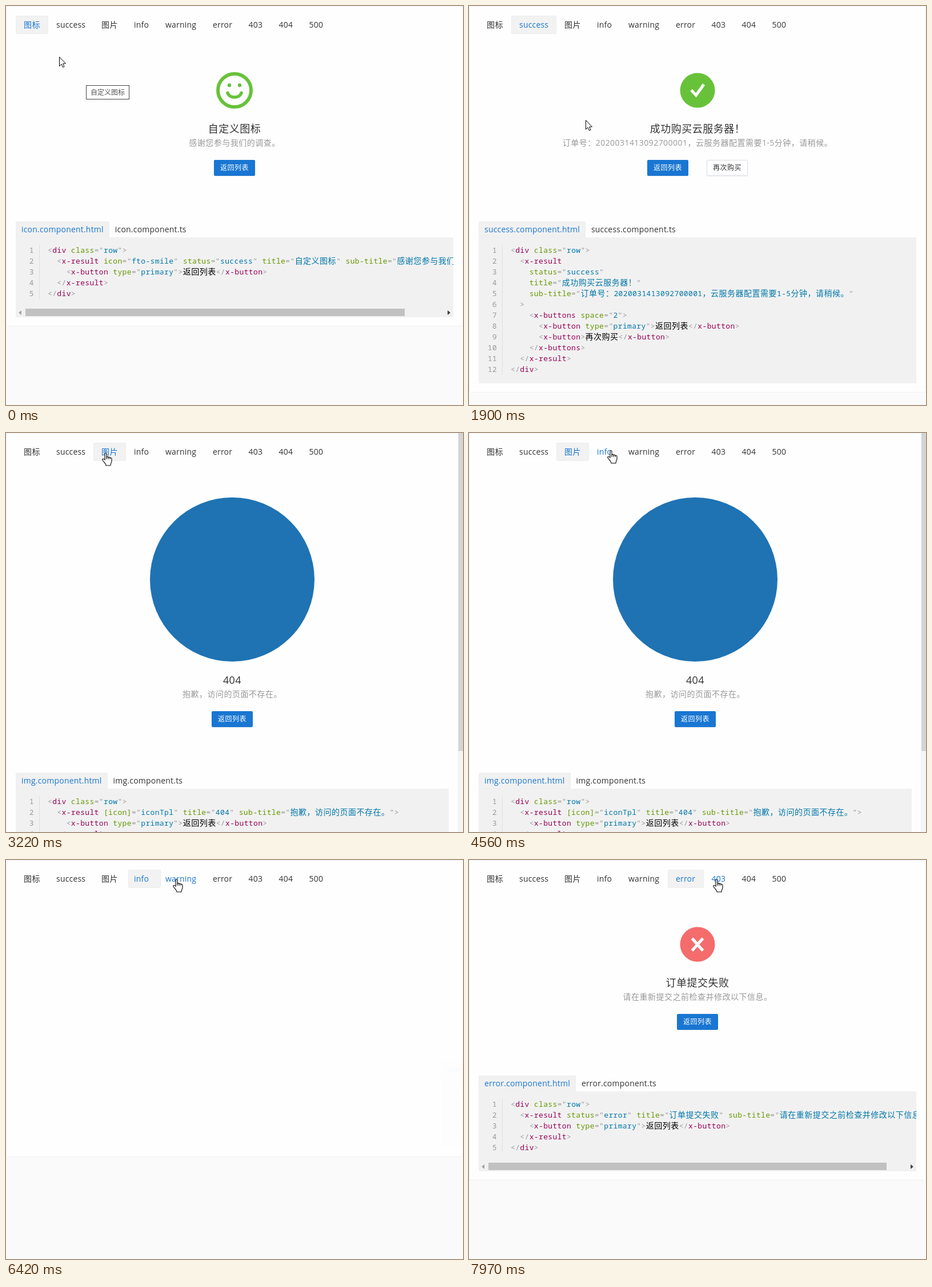
Recreate the animation shown at these times as an HTML page. Size 800 px wide and 700 px high, loop 8000 ms.

```html
<!DOCTYPE html>
<html lang="zh-CN">
<head>
<meta charset="utf-8">
<style>
html, body { margin: 0; width: 100%; height: 100%; overflow: hidden; background: #fafafa; }
body { position: relative; font: 14px 'Open Sans', 'Noto Sans CJK SC', 'Noto Sans CJK', sans-serif; letter-spacing: .2px; color: #333; }
div, svg { position: absolute; box-sizing: border-box; white-space: pre; }
i { font-style: normal; letter-spacing: .5px; line-height: 0; }
#card { left: 0; top: 0; overflow: hidden; background: #fefefe; }
#card::after { content: ''; position: absolute; inset: 0; border: 1px solid #f0f1fa; }
#ink { top: 17px; height: 32px; background: #f2f2f2; border: 1px solid #ededee; border-radius: 2px; }
.tab { top: 17px; line-height: 32px; }
.page { left: 0; top: 0; height: 100%; }
.title, .sub { width: 100%; text-align: center; letter-spacing: .45px; }
.title { font-size: 18px; line-height: 24px; }
.sub { line-height: 20px; color: #999; }
.btn { width: 72px; height: 28px; border: 1px solid #d9dde6; border-radius: 2px; background: #fff; font-size: 12px; line-height: 25px; text-align: center; box-shadow: 0 1px 2px #0001; }
.primary { background: #1976d2; border-color: #1976d2; color: #fff; font-weight: 500; }
.files { left: 17px; height: 28px; line-height: 28px; display: flex; }
.files span { padding: 0 10px; }
.files .on { background: #f1f1f1; color: #1976d2; border-radius: 2px 2px 0 0; box-shadow: inset 0 0 0 1px #eee; }
.code { left: 17px; background: #f1f1f1; overflow: hidden; font: 13px/19px 'Noto Sans Mono', 'Noto Sans CJK SC', 'Noto Sans CJK', monospace; letter-spacing: .36px; color: #000; }
.code i { font: 14px/0 'Noto Sans CJK SC', 'Noto Sans CJK', sans-serif; letter-spacing: .5px; }
.nums { left: 0; top: 13px; width: 42px; padding-right: 9px; text-align: right; color: #999; border-right: 1px solid #dcdfe6; }
.line { left: 56px; height: 19px; }
.p { color: #999; } .t { color: #905; } .a { color: #690; } .v { color: #07a; }
.track { left: 0; width: 100%; height: 17px; }
.thumb { left: 17px; top: 2px; height: 13px; background: #c1c1c1; }
.arrow { top: 5px; border: 4px solid transparent; border-width: 4px 5px; }
#scroll { left: 792px; top: 0; width: 8px; height: 700px; background: #f5f5f5; }
#scroll div { width: 8px; height: 558px; background: #d4d4d4; }
#tip { left: 140px; top: 139px; width: 76px; height: 25px; border: 1px solid #444; background: #fff; color: #575757; font-size: 12px; line-height: 23px; text-align: center; }
#tip i { letter-spacing: 0; }
#pointer { left: 0; top: 0; overflow: visible; }
</style>
</head>
<body>
<div id="card"><div id="ink"></div></div>
<div id="scroll"><div></div></div>
<div id="tip"></div>
<svg id="pointer" width="20" height="25" fill="#fff" stroke="#000">
  <path id="arrow" d="M.5 .5V16.5L4 13 6.5 18.5 9 17.5 6.6 12H11.5Z"/>
  <path id="hand" stroke-width="1.1" d="M5 13V2.2C5 .3 8 .3 8 2.2V8.5C8.3 7.3 11 7.3 11 9C11.5 8 14 8 14 9.8C14.6 9 17 9.2 17 11V15C17 18 15 19 15 23H7C7 20 3.5 17.5 1 13.5C0 11.5 2.5 10.5 5 13ZM8 8.5V12M11 9V12M14 10V12"/>
</svg>
<script>
const $ = id => document.getElementById(id);
// full-width forms of the punctuation used in Chinese text
const wide = s => s.replace(/[,!]|(?<=号):/g, c => String.fromCharCode(c.charCodeAt(0) + 0xfee0));
const cjk = s => wide(s).replace(/[^\x00-\xff]+/g, '<i>$&</i>');
const span = (c, s) => `<span class="${c}">${s}</span>`;

const names = ['图标', 'success', '图片', 'info', 'warning', 'error', '403', '404', '500'];
const edges = [17, 74, 153, 210, 265, 348, 410.5, 463.5, 516.5];

const disc = (color, mark) => `<circle cx="32" cy="32" r="30.5" fill="${color}"/><path d="${mark}" fill="none" stroke="#fff" stroke-width="5"/>`;
const icons = {
  smile: `<g fill="none" stroke="#67c23a" stroke-width="6"><circle cx="32" cy="32" r="29"/>
    <path d="M20 36.5C23 46.5 41 46.5 44 36.5" stroke-width="5.5" stroke-linecap="round"/></g>
    <g fill="#67c23a"><circle cx="23" cy="23" r="3.2"/><circle cx="41" cy="23" r="3.2"/></g>`,
  success: disc('#67c23a', 'M21 31.5L29.5 40.5L43 21.5'),
  info: disc('#909399', 'M32 28V48M32 17V23'),
  warning: disc('#e6a23c', 'M32 16V38M32 42V48'),
  error: disc('#f56c6c', 'M22.5 21.5L41.5 43M41.5 21.5L22.5 43')
};

const back = '    <x-button type="primary">返回列表</x-button>';
const wrap = (open, ...body) => ['<div class="row">', ...open, ...body, '  </x-result>', '</div>'];
const simple = attrs => wrap([`  <x-result ${attrs}>`], back);

// click: the old page starts to fade; enter: the new one slides in
const pages = [
  { file: 'icon', icon: 'smile', title: '自定义图标', sub: '感谢您参与我们的调查。', thumb: 664, click: -900, enter: -900,
    code: simple('icon="fto-smile" status="success" title="自定义图标" sub-title="感谢您参与我们的调查。"') },
  { file: 'success', icon: 'success', title: '成功购买云服务器!', sub: '订单号:2020031413092700001,云服务器配置需要1-5分钟,请稍候。',
    second: '再次购买', click: 800, enter: 935,
    code: wrap(['  <x-result', '    status="success"', '    title="成功购买云服务器!"',
      '    sub-title="订单号:2020031413092700001,云服务器配置需要1-5分钟,请稍候。"', '  >'],
      '    <x-buttons space="2">', '  ' + back, '      <x-button>再次购买</x-button>', '    </x-buttons>') },
  { file: 'img', title: '404', sub: '抱歉,访问的页面不存在。', width: 792, click: 2900, enter: 2915,
    code: simple('[icon]="iconTpl" title="404" sub-title="抱歉,访问的页面不存在。"') },
  { file: 'info', icon: 'info', title: '您的操作已经被执行!', click: 4930, enter: 5190,
    code: simple('status="info" title="您的操作已经被执行!"') },
  { file: 'warning', icon: 'warning', title: '您的操作出现了一些问题!', click: 6270, enter: 6408,
    code: simple('status="warning" title="您的操作出现了一些问题!"') },
  { file: 'error', icon: 'error', title: '订单提交失败', sub: '请在重新提交之前检查并修改以下信息。', thumb: 697, click: 7655, enter: 7670,
    code: simple('status="error" title="订单提交失败" sub-title="请在重新提交之前检查并修改以下信息。"') }
];

function paint(line) {
  const html = line.replace(/(<\/?)([\w-]+)|([\w\-[\]]+)="([^"]*)"|>/g, (m, open, tag, attr, value) =>
    tag ? span('p', open.replace('<', '&lt;')) + span('t', tag)
    : attr ? span('a', attr) + span('p', '="') + span('v', value) + span('p', '"')
    : span('p', '&gt;'));
  return cjk(html);
}

function build(p) {
  const w = p.width || 800, mid = w / 2, shift = p.icon ? 0 : 218;
  const btnY = 246 + shift + (p.sub ? 24 : 0), codeY = btnY + 136;
  const n = p.code.length, codeH = 28 + 19 * n, fullH = codeH + (p.thumb ? 17 : 0);
  p.width = w;
  p.height = codeY + fullH + 16;
  const btn = (x, text, cls) => `<div class="btn ${cls}" style="left:${x}px;top:${btnY}px">${cjk(text)}</div>`;
  const picture = p.icon
    ? `<svg width="64" height="64" style="left:${mid - 32}px;top:116px">${icons[p.icon]}</svg>`
    : `<div style="left:252px;top:113px;width:288px;height:288px;border-radius:50%;background:#1f73b3"></div>`;
  const bar = p.thumb ? `<div class="track" style="top:${codeH}px">
    <div class="arrow" style="left:0;border-right-color:#a3a3a3"></div>
    <div class="thumb" style="width:${p.thumb}px"></div>
    <div class="arrow" style="right:0;border-left-color:#404040"></div></div>` : '';
  p.el = document.createElement('div');
  p.el.className = 'page';
  p.el.style.width = w + 'px';
  p.el.innerHTML = picture +
    `<div class="title" style="top:${203 + shift}px">${cjk(p.title)}</div>` +
    (p.sub ? `<div class="sub" style="top:${230 + shift}px">${cjk(p.sub)}</div>` : '') +
    btn(mid - (p.second ? 88 : 36), '返回列表', 'primary') +
    (p.second ? btn(mid + 16, p.second, '') : '') +
    `<div class="files" style="top:${codeY - 28}px">${span('on', p.file + '.component.html')}${span('', p.file + '.component.ts')}</div>` +
    `<div class="code" style="top:${codeY}px;width:${w - 34}px;height:${fullH}px">
      <div class="nums">${p.code.map((_, i) => i + 1).join('\n')}</div>` +
    p.code.map((s, i) => `<div class="line" style="top:${13 + 19 * i}px">${paint(s)}</div>`).join('') + bar + '</div>';
  $('card').append(p.el);
}
pages.forEach(build);

const tabs = names.map((name, i) => {
  const el = document.createElement('div');
  el.className = 'tab';
  el.style.left = edges[i] + 14 + 'px';
  el.innerHTML = cjk(name);
  $('card').append(el);
  return el;
});
$('tip').innerHTML = cjk('自定义图标');

const clamp = v => Math.max(0, Math.min(1, v));
const mix = (a, b, k) => a + (b - a) * k;

// cubic-bezier(.25, .1, .25, 1)
function ease(x) {
  const curve = (a, b, s) => 3 * a * s * (1 - s) ** 2 + 3 * b * s * s * (1 - s) + s ** 3;
  let lo = 0, hi = 1;
  for (let i = 0; i < 24; i++) {
    const s = (lo + hi) / 2;
    if (curve(.25, .25, s) < x) lo = s; else hi = s;
  }
  return x >= 1 ? 1 : curve(.1, 1, lo);
}

const path = [
  [0, 93, 89], [69, 93, 89], [70, 101, 84], [250, 101, 84], [650, 110, 38], [1660, 110, 38],
  [1850, 180, 248], [2080, 290, 33], [2230, 230, 1], [2370, 172, 31], [2470, 172, 31], [2760, 168, 34],
  [3860, 168, 34], [4180, 237, 35], [4470, 237, 35], [4560, 242, 30], [5650, 242, 30], [5950, 292, 33],
  [7280, 292, 33], [7520, 372, 33], [7670, 372, 33], [7960, 427, 33], [8000, 427, 33]
];
function pointerAt(t) {
  const i = path.findIndex(k => k[0] > t), a = path[i - 1], b = path[i];
  const k = (t - a[0]) / (b[0] - a[0]);
  return [mix(a[1], b[1], k), mix(a[2], b[2], k)];
}

function render(t) {
  const now = pages.findLastIndex(p => p.enter <= t);
  const page = pages[now], next = pages[now + 1], age = t - page.enter;
  const left = 1 - ease(clamp(age / 300));
  const fade = next ? 1 - clamp((t - next.click) / 130) : 1;

  pages.forEach((p, i) => p.el.style.display = i === now ? '' : 'none');
  page.el.style.transform = left ? `translateX(${766 * left}px)` : '';
  page.el.style.opacity = (1 - left ** 1.3) * fade;
  $('card').style.width = page.width + 'px';
  $('card').style.height = page.height + 'px';
  $('scroll').style.display = page.width < 800 ? '' : 'none';

  const from = Math.max(0, now - 1), k = ease(clamp(age / 150));
  $('ink').style.left = mix(edges[from], edges[now], k) + 'px';
  $('ink').style.width = mix(edges[from + 1] - edges[from], edges[now + 1] - edges[now], k) + 'px';

  const [x, y] = pointerAt(t);
  const over = y >= 17 && y < 49 ? edges.findLastIndex(e => e <= x + 6) : -1;
  const active = age < 60 ? from : now;
  tabs.forEach((el, i) => el.style.color = i === active || i === over ? '#1976d2' : '');
  $('pointer').style.transform = `translate(${Math.round(x)}px,${Math.round(y)}px)`;
  $('hand').style.display = over < 0 ? 'none' : '';
  $('arrow').style.display = over < 0 ? '' : 'none';
  $('tip').style.display = t < 250 ? '' : 'none';
}

const start = performance.now();
function tick() {
  render((performance.now() - start) % 8000);
  requestAnimationFrame(tick);
}
tick();
</script>
</body>
</html>
```
